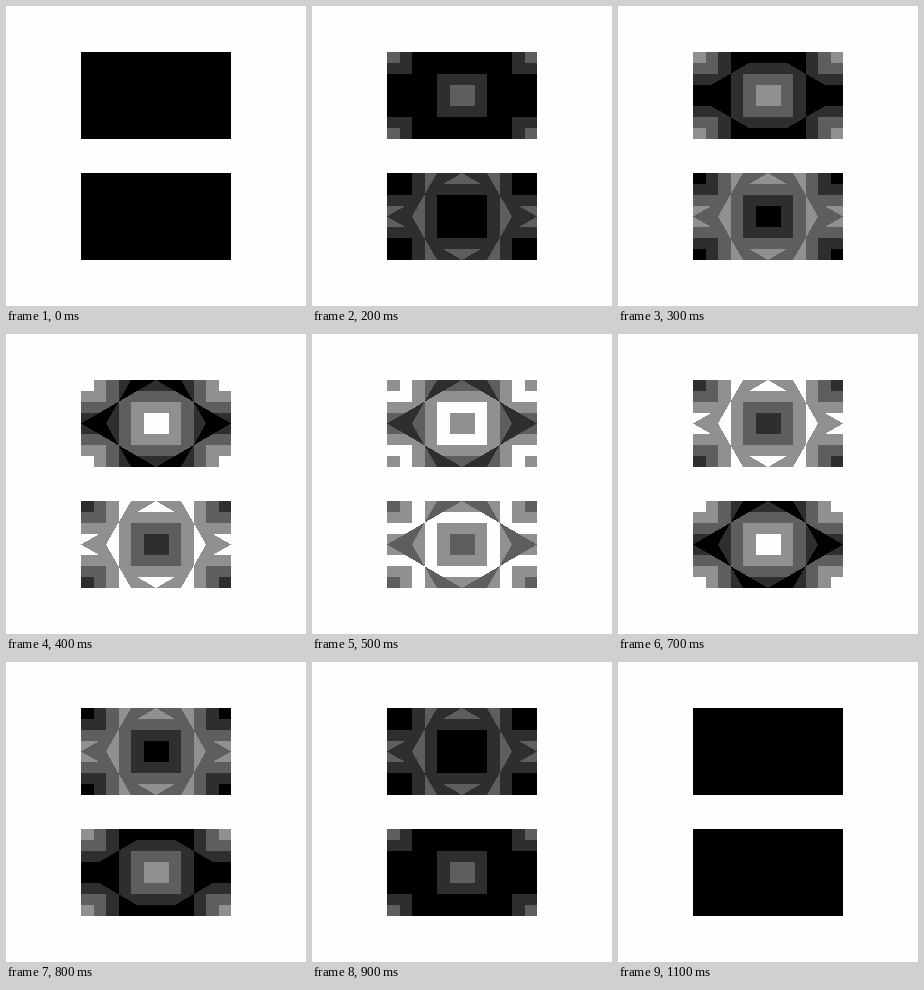
An HTML page for the animation above (1200 ms loop, 300 px wide and 300 px high).

```html
<!DOCTYPE html>
<html lang="en">
<head>
<meta charset="utf-8">
<title>Pulsing tiles</title>
<style>
  html, body { margin: 0; width: 100%; height: 100%; overflow: hidden; background: #fefffd; }
  svg { display: block; }
</style>
</head>
<body>
<svg id="stage" width="300" height="300" shape-rendering="crispEdges"></svg>
<script>
const NS = 'http://www.w3.org/2000/svg';
const SHADES = ['#000000', '#2e2e2e', '#5e5e5e', '#909090', '#fefffd'];
const STEP = 100, STEPS = 12;

// Tile centres on a 12 x 8 grid: the middle and the four corners
const CENTRES = [[6, 4], [0, 0], [12, 0], [0, 8], [12, 8]];

// One quadrant of each ring, outermost first, with its brightest step
const RINGS = [
  { quad: [[4, 0], [3, 2], [0, 4]], peak: 7 },
  { quad: [[3, 0], [3, 2], [1.5, 3], [0, 3]], peak: 6 },
  { quad: [[2, 0], [2, 2], [0, 2]], peak: 5 },
  { quad: [[1, 0], [1, 1], [0, 1]], peak: 4 },
];

function add(parent, tag, attrs) {
  const el = document.createElementNS(NS, tag);
  for (const name in attrs) el.setAttribute(name, attrs[name]);
  return parent.appendChild(el);
}

// Mirrors a quadrant into a closed outline around every centre
function ringPath(quad) {
  const flip = (points, sx, sy) => points.map(([x, y]) => [x * sx, y * sy]);
  const back = [...quad].reverse();
  const outline = [...quad, ...flip(back, -1, 1), ...flip(quad, -1, -1), ...flip(back, 1, -1)];
  return CENTRES.map(([cx, cy]) =>
    'M' + outline.map(([x, y]) => `${cx + x} ${cy + y}`).join('L') + 'Z').join('');
}

function makePanel(y) {
  const panel = add(document.getElementById('stage'), 'svg', {
    x: 75, y, width: 150, height: 87, viewBox: '0 0 12 8',
    preserveAspectRatio: 'none', overflow: 'hidden',
  });
  const base = add(panel, 'rect', { width: 12, height: 8 });
  const rings = RINGS.map(({ quad }) => add(panel, 'path', { d: ringPath(quad) }));

  return step => {
    const paint = (el, top, peak) =>
      el.setAttribute('fill', SHADES[Math.max(0, top - Math.abs(step - peak))]);
    paint(base, 3, 7);
    rings.forEach((ring, i) => paint(ring, 4, RINGS[i].peak));
  };
}

const drawTop = makePanel(46);
const drawBottom = makePanel(167);
const start = performance.now();

function tick() {
  const step = Math.floor((performance.now() - start) / STEP) % STEPS;
  drawTop(step);
  drawBottom(STEPS - 1 - step); // runs the same pulse backwards
  requestAnimationFrame(tick);
}
tick();
</script>
</body>
</html>
```
